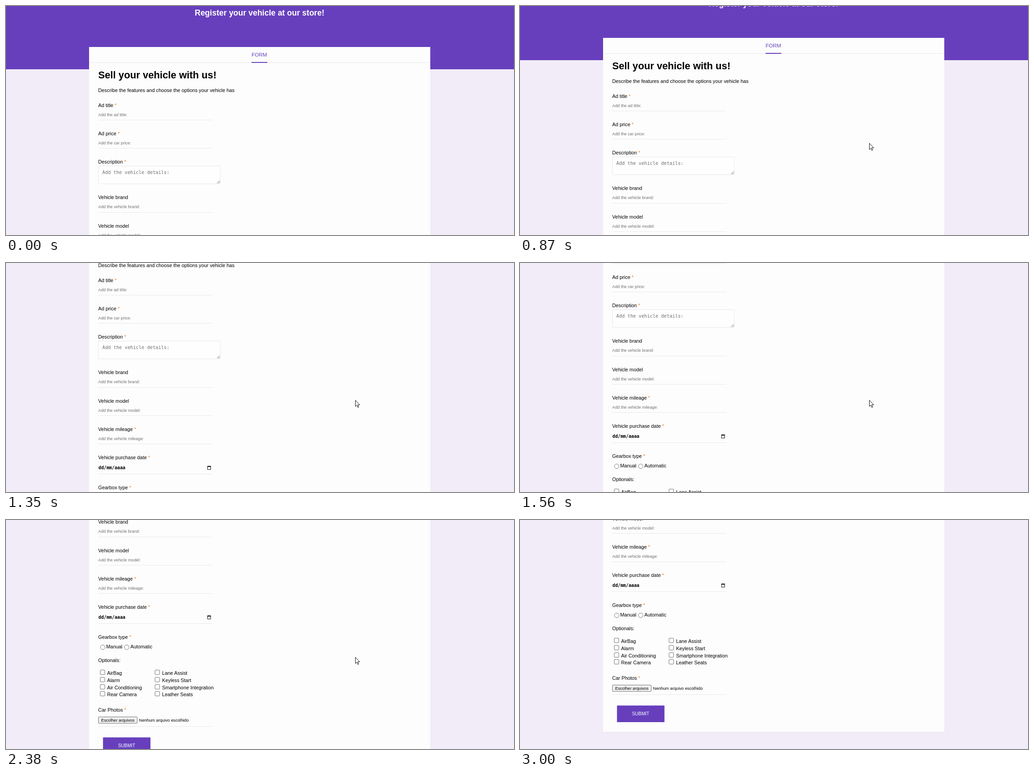
Recreate the animation shown at these times as an HTML page. Size 1113 px wide and 503 px high, loop 3480 ms.

```html
<!DOCTYPE html>
<html lang="en">
<head>
<meta charset="utf-8">
<title>Vehicle form</title>
<style>
html, body { margin: 0; width: 100%; height: 100%; overflow: hidden; background: #f2ecf8; }
svg { display: block; width: 1113px; height: 503px; }
text { font: 10.82px Arial, "Liberation Sans", sans-serif; fill: #000; white-space: pre; }
.hint { font-size: 9.2px; fill: #6f6f6f; }
.small { font-size: 9.2px; }
.star { fill: #e67e22; }
.mono { font: 10.2px "DejaVu Sans Mono", monospace; fill: #6f6f6f; }
.date { font: bold 9.8px "DejaVu Sans Mono", monospace; }
.head { font-size: 17.5px; font-weight: bold; fill: #fff; text-anchor: middle; }
.title { font-size: 21.7px; font-weight: bold; }
.tab { font-size: 11.55px; fill: #673fbd; }
.send { font-size: 10px; fill: #fff; text-anchor: middle; }
.purple { fill: #673fbd; }
.rule { fill: #e9e8ef; }
.box { fill: #fff; stroke: #767676; }
#page { animation: scroll 3.48s step-end infinite; }
#cursor { animation: point 3.48s step-end infinite; }

/* one wheel notch is about 83px, eased over three or four steps */
@keyframes scroll {
  0% { transform: translateY(0); }
  24.99% { transform: translateY(-20px); }
  27.01% { transform: translateY(-56px); }
  29.02% { transform: translateY(-81px); }
  31.03% { transform: translateY(-107px); }
  33.04% { transform: translateY(-142px); }
  35.05% { transform: translateY(-166px); }
  38.79% { transform: translateY(-180px); }
  40.8% { transform: translateY(-217px); }
  42.81% { transform: translateY(-244px); }
  44.82% { transform: translateY(-249px); }
  56.32% { transform: translateY(-266px); }
  58.33% { transform: translateY(-302px); }
  60.34% { transform: translateY(-328px); }
  62.35% { transform: translateY(-333px); }
  64.36% { transform: translateY(-354px); }
  66.37% { transform: translateY(-391px); }
  68.39% { transform: translateY(-416px); }
  70.4% { transform: translateY(-434px); }
  72.41% { transform: translateY(-468px); }
  74.42%, 100% { transform: translateY(-486px); }
}
@keyframes point {
  0% { transform: translate(1200px, 600px); }
  2.01% { transform: translate(1065px, 488px); }
  4.02% { transform: translate(985px, 424px); }
  5.74% { transform: translate(893px, 362px); }
  7.75% { transform: translate(815px, 317px); }
  9.77% { transform: translate(771px, 296px); }
  11.49% { transform: translate(755px, 291px); }
  13.5% { transform: translate(765px, 301px); }
  80.17% { transform: translate(791px, 327px); }
  82.18% { transform: translate(860px, 391px); }
  84.19% { transform: translate(941px, 467px); }
  86.2%, 100% { transform: translate(1200px, 600px); }
}
</style>
</head>
<body>
<svg viewBox="0 0 1113 503">
  <g id="page">
    <rect class="purple" width="1113" height="139"/>
    <text class="head" x="555.5" y="21">Register your vehicle at our store!</text>
    <rect x="182" y="90" width="747.5" height="861" fill="#fdfdfd"/>
    <rect class="rule" x="182" y="124" width="747.5" height="1"/>
    <text class="tab" x="538" y="111">FORM</text>
    <rect class="purple" x="538" y="123" width="34.5" height="2"/>
    <text class="title" x="202" y="159">Sell your vehicle with us!</text>
    <text x="202" y="188.5">Describe the features and choose the options your vehicle has</text>

    <text x="202" y="221.5">Ad title <tspan class="star">*</tspan></text>
    <text class="hint" x="202" y="242">Add the ad title:</text>
    <rect class="rule" x="202" y="250" width="250" height="1"/>

    <text x="202" y="284">Ad price <tspan class="star">*</tspan></text>
    <text class="hint" x="202" y="304">Add the car price:</text>
    <rect class="rule" x="202" y="312" width="250" height="1"/>

    <text x="202" y="346">Description <tspan class="star">*</tspan></text>
    <rect x="202.5" y="351.5" width="267" height="39" rx="1" fill="#fefefe" stroke="#e9e8ef"/>
    <text class="mono" x="211" y="369">Add the vehicle details:</text>
    <path d="M462.5 389.5l6-6M466 389.5l2.5-2.5" stroke="#666" fill="none"/>

    <text x="202" y="424">Vehicle brand</text>
    <text class="hint" x="202" y="444">Add the vehicle brand:</text>
    <rect class="rule" x="202" y="453" width="250" height="1"/>

    <text x="202" y="486.5">Vehicle model</text>
    <text class="hint" x="202" y="506.5">Add the vehicle model:</text>
    <rect class="rule" x="202" y="515" width="250" height="1"/>

    <text x="202" y="548.5">Vehicle mileage <tspan class="star">*</tspan></text>
    <text class="hint" x="202" y="569">Add the vehicle mileage:</text>
    <rect class="rule" x="202" y="577" width="250" height="1"/>

    <text x="202" y="611">Vehicle purchase date <tspan class="star">*</tspan></text>
    <text class="date" x="202.5" y="632.5">dd/mm/aaaa</text>
    <path d="M441.5 626.5h7v7h-7zM441 627.5h8M443 625v2M447 625v2" fill="none" stroke="#111"/>
    <rect class="rule" x="202" y="643" width="250" height="1"/>

    <text x="202" y="676.5">Gearbox type <tspan class="star">*</tspan></text>
    <circle class="box" cx="212" cy="695.5" r="5"/>
    <text x="219.5" y="698">Manual</text>
    <circle class="box" cx="264.5" cy="695.5" r="5"/>
    <text x="272.5" y="698">Automatic</text>

    <text x="202" y="727.5">Optionals:</text>
    <g id="options"></g>

    <text x="202" y="836.5">Car Photos <tspan class="star">*</tspan></text>
    <rect x="202.5" y="848.5" width="85" height="14" rx="1.5" fill="#efefef" stroke="#767676"/>
    <text class="small" x="208.5" y="859">Escolher arquivos</text>
    <text class="small" x="291.5" y="859">Nenhum arquivo escolhido</text>
    <rect class="rule" x="202" y="869" width="250" height="1"/>

    <rect class="purple" x="212.5" y="893.5" width="104" height="36.5"/>
    <text class="send" x="264.3" y="915.2">SUBMIT</text>
  </g>
  <path id="cursor" d="M.5.5v13.6l3.1-2.9 2.2 5.1 2.1-.9-2.2-4.9h4.2z" fill="#fff" stroke="#111"/>
</svg>
<script>
const columns = [
  [206, 221.5, ["AirBag", "Alarm", "Air Conditioning", "Rear Camera"]],
  [326, 342, ["Lane Assist", "Keyless Start", "Smartphone Integration", "Leather Seats"]]
];
const option = (boxX, textX, name, row) => {
  const y = 745.5 + Math.round(row * 15.8);
  return `<rect class="box" x="${boxX + .5}" y="${y}" width="10" height="10" rx="1.5"/>
    <text x="${textX}" y="${y + 10}">${name}</text>`;
};
document.getElementById("options").innerHTML = columns.map(([boxX, textX, names]) =>
  names.map((name, row) => option(boxX, textX, name, row)).join("")).join("");
</script>
</body>
</html>
```
